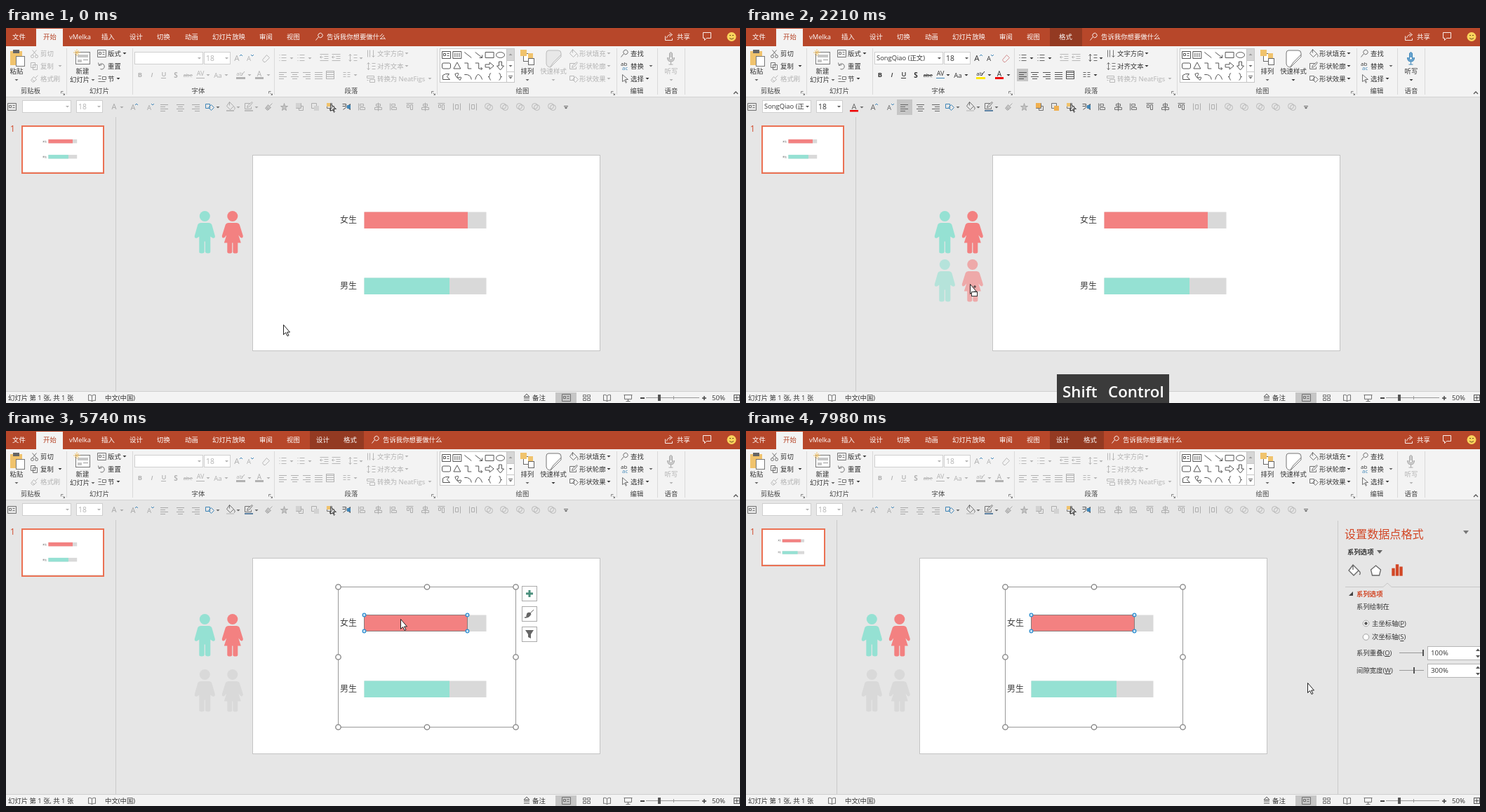
Recreate the animation shown at these times as an HTML page with a canvas. Size 1046 px wide and 535 px high, loop 8 s.

```html
<!DOCTYPE html>
<html lang="zh-CN">
<head>
<meta charset="utf-8">
<style>
html, body { margin: 0; width: 100%; height: 100%; overflow: hidden; background: #e6e6e6 }
canvas { display: block }
</style>
</head>
<body>
<canvas id="stage" width="1046" height="535"></canvas>
<script>
const c = document.getElementById('stage').getContext('2d', { alpha: false });
const FONT = "'Open Sans','Noto Sans CJK SC','Noto Sans CJK',sans-serif";
const INK = '#333', DIM = '#b2b2b2', RED = '#b7472a', ORANGE = '#d24726', GOLD = '#f0c36d', BLUE = '#3f86b8';
const PINK = '#f38181', TEAL = '#95e1d3', GRAY = '#d9d9d9', LINE = '#c6c6c6', PANEL = '#f3f3f3';

const MAN = 'M-6 9.5H6Q9 9.5 10 12L14.5 28Q15 32 11 31L8 29V50.5Q8 53 4.5 53T.6 50.5V36H-.6V50.5Q-.6 53-4.5 53T-8 50.5V29L-11 31Q-15 32-14.5 28L-10 12Q-9 9.5-6 9.5Z';
const WOMAN = 'M-6 9.5H6Q9 9.5 10 12L15 28Q15 32 11.5 30.5L8.5 27L12 38H7.5V51Q7.5 53 4 53T.6 51V38H-.6V51Q-.6 53-4 53T-7.5 51V38H-12L-8.5 27L-11.5 30.5Q-15 32-15 28L-10 12Q-9 9.5-6 9.5Z';
const ICON = {
  cut: 'M-3-5L3 2M3-5L-3 2M-5 4a2 2 0 1 0 4 0a2 2 0 1 0-4 0M1 4a2 2 0 1 0 4 0a2 2 0 1 0-4 0',
  copy: 'M-5-5H1V2H-5ZM-2-2H4V5H-2Z',
  brush: 'M5-5L1-1M-1-3L3 1L-2 5L-5 2ZM-3 1L0 4',
  bucket: 'M-1-6L5 0L0 5L-5 0ZM-1-6V-1M5 0Q8 3 6 5',
  pen: 'M2-4H-5V4H4V1M-2 2L-1-1L5-6L6-5L1 1Z',
  layout: 'M-6-5H6V5H-6ZM-4-2H-1V1H-4ZM1-2H4M1 1H4',
  undo: 'M-4-1A4 4 0 1 1-2 4M-5-5L-4-1L0-2',
  section: 'M-5-4H-1M1-3H6V1H1ZM-5 0H-1M-5 4H5',
  eraser: 'M-5 2L1-5L5-1L-1 5H-3Z',
  search: 'M-1 0a3 3 0 1 0 5-4a3 3 0 1 0-5 4L-5 5',
  pointer: 'M-3-6V4L0 2L2 6L3 5L1 1H5Z',
  star: 'M0-5L1-1H5L2 1L3 5L0 3L-3 5L-2 1L-5-1H-1Z',
  stack: 'M-5-5H2V2H-5ZM2-1H5V5H-1V2',
  shapes: 'M-5-4H1V2H-5ZM-1 1L3-3L7 1L3 5Z',
  list: 'M-5-4H-4M-5 0H-4M-5 4H-4M-2-4H5M-2 0H5M-2 4H5',
  indent: 'M-6-5H6M0-2H6M0 1H6M-6 4H6M-2-1H-6L-4-3M-6-1L-4 1',
  spacing: 'M-4-5V5M-6-3L-4-5L-2-3M-6 3L-4 5L-2 3M1-4H6M1 0H6M1 4H6',
  columns: 'M-5-4H-1M-5-1H-1M-5 2H-1M1-4H5M1-1H5M1 2H5',
  textDir: 'M-5-5V5M-2-5V5M3-5V5M1 3L3 5L5 3',
  convert: 'M-6-4H4V-1H-6ZM-2 1H5V5H-2ZM-6 2H-4',
  launcher: 'M-2 1V-2H1M0 0L3 3M3 1V3H1',
  comment: 'M-5-5H6V3H0L-3 6V3H-5Z',
  share: 'M-5-1V5H5V2M-3 2Q-2-3 3-3M1-6L5-3L1 0',
  mic: 'M-2-7Q0-10 2-7V1Q0 4-2 1ZM-5-1Q-5 5 0 5T5-1M0 5V9M-3 9H3',
  book: 'M0-3Q-3-5-5-4V4Q-3 3 0 5Q3 3 5 4V-4Q3-5 0-3V5',
  grid: 'M-5-4H-1V-1H-5ZM1-4H5V-1H1ZM-5 1H-1V4H-5ZM1 1H5V4H1Z',
  show: 'M-6-4H6M-5-4V2H5V-4M0 2V5M-3 5H3',
  funnel: 'M-6-6H6L2 0V6L-2 4V0Z',
  pentagon: 'M0-7L7-1L5 7H-5L-7-1Z',
  circles: 'M-5-1a4 4 0 1 0 8 0a4 4 0 1 0-8 0M-2 1a4 4 0 1 0 8 0a4 4 0 1 0-8 0',
  alignL: 'M-5-5V5M-3-4H2V-1H-3ZM-3 1H4V4H-3Z',
  alignC: 'M0-6V6M-3-4H3V-1H-3ZM-5 1H5V4H-5Z',
  alignT: 'M-5-5H5M-4-3V1H-1V-3ZM1-3V4H4V-3Z',
  spread: 'M-5-5V5M5-5V5M-2-3H2V3H-2Z'
};
const GALLERY = [
  ICON.layout, 'M-6-5H6V5H-6ZM-3-3V3M0-3V3M3-3V3', 'M-5-4L5 4', 'M-5-4L5 4M5 0V4H1', 'M-6-4H6V4H-6Z', 'M-6 0A6 4 0 1 1 6 0A6 4 0 1 1-6 0',
  'M-4-4H4Q6-4 6-2V2Q6 4 4 4H-4Q-6 4-6 2V-2Q-6-4-4-4', 'M0-5L5 4H-5Z', 'M-5-4H0V4H5', 'M-5-4H0V4H5M3 2L5 4L3 6', 'M-6-2H0V-5L6 0L0 5V2H-6Z', 'M-2-6H2V0H5L0 6L-5 0H-2Z',
  'M-5 4V-2L-1-4H4L1 0L5 4Z', 'M-3-4Q4-7 1-2T3 1T4 5L-2-1Z', 'M-5-3Q4-4 5 4', 'M-5 4Q-3-4 0-3T5 4', 'M2-5Q0-5 0-2T-2 0Q0 0 0 2T2 5', 'M-2-5Q0-5 0-2T2 0Q0 0 0 2T-2 5'];

// time, x, y of the pointer tip
const PATH = [[0, 395, 423], [410, 395, 423], [680, 242, 370], [1110, 384, 231], [1190, 389, 221], [1270, 389, 221],
  [1650, 319, 296], [1900, 319, 296], [2210, 319, 365], [2500, 319, 375], [3010, 319, 375], [3290, 354, 134],
  [3760, 322, 109], [3920, 322, 109], [4640, 530, 256], [4940, 562, 268], [6280, 562, 268], [6510, 603, 403],
  [6730, 608, 413], [7510, 608, 413], [7960, 800, 359], [8000, 800, 359]];

const MENU = [[279, '删除系列(T)'], [298, '重设以匹配样式(A)', 'undo'], [319, '更改系列图表类型(Y)...', 'chart'], [338, '编辑数据(E)', 'layout'],
  [357, '三维旋转(R)...', 'copy'], [378, '添加数据标签(B)'], [398, '添加趋势线(R)...'], [417, '设置数据点格式(F)...', 'chart'], [437, '新建批注(M)', 'comment']];

function pointerAt(t) {
  const i = PATH.findIndex(k => k[0] > t), [t0, x0, y0] = PATH[i - 1], [t1, x1, y1] = PATH[i];
  const p = (t - t0) / (t1 - t0);
  return [x0 + (x1 - x0) * p, y0 + (y1 - y0) * p];
}
function text(s, x, y, color = INK, size = 9.4, align = 'left', weight = 400) {
  c.font = `${weight} ${size}px ${FONT}`;
  c.textAlign = align;
  c.fillStyle = color;
  c.fillText(s, x, y + size * .37);
}
function box(x, y, w, h, fill, stroke) {
  if (fill) { c.fillStyle = fill; c.fillRect(x, y, w, h); }
  if (stroke) { c.strokeStyle = stroke; c.lineWidth = 1; c.strokeRect(x + .5, y + .5, w - 1, h - 1); }
}
function shape(d, x, y, fill, stroke, width = 1) {
  const path = new Path2D(d);
  c.save();
  c.translate(x, y);
  if (fill) { c.fillStyle = fill; c.fill(path); }
  if (stroke) { c.strokeStyle = stroke; c.lineWidth = width; c.stroke(path); }
  c.restore();
}
const icon = (name, x, y, color = '#666') => shape(ICON[name], x + .5, y + .5, null, color, .9);
const arrow = (x, y, color = '#666') => shape('M-2.5-1H2.5L0 1.5Z', x, y, color);
function dot(x, y, r, fill, stroke, width = 1) {
  c.beginPath();
  c.arc(x, y, r, 0, 7);
  if (fill) { c.fillStyle = fill; c.fill(); }
  if (stroke) { c.strokeStyle = stroke; c.lineWidth = width; c.stroke(); }
}
function lines(x, y, color, side) {
  [11, 7, 11, 7].forEach((w, i) => box(x - 5 + (11 - w) / 2 * side, y - 4 + i * 3, w, 1, color));
}
function combo(x, y, w, s, on, size) {
  box(x, y, w, 18, '#fff', '#cfcfcf');
  text(s, x + 3, y + 9, on ? INK : DIM, size);
  arrow(x + w - 5.5, y + 9, on ? '#555' : DIM);
}
function chartIcon(x, y, s, colors) {
  colors.forEach((col, i) => box(x + (i * 5 - 7) * s, y + [-3, -8, -5][i] * s, 4 * s, [10, 15, 12][i] * s, col));
}
function accelText(s, x, y, color = INK) {
  text(s, x, y, color);
  const i = s.indexOf('(') + 1, w = n => c.measureText(s.slice(0, n)).width;
  c.fillRect(x + w(i), Math.round(y + 4.6), w(i + 1) - w(i), 1);
}

function tabs(mode) {
  box(0, 0, 1046, 26, RED);
  if (mode) box(433, 0, mode > 1 ? 77 : 46, 26, '#933a22');
  box(43, 1, 38, 25, PANEL);
  [['文件', 9], ['开始', 53], ['vMelka', 90], ['插入', 136], ['设计', 176], ['切换', 215], ['动画', 255], ['幻灯片放映', 294], ['审阅', 361], ['视图', 400]]
    .forEach(([s, x], i) => text(s, x, 12.5, i == 1 ? RED : '#fff'));
  if (mode == 1) text('格式', 446, 12.5, '#fff');
  if (mode == 2) { text('设计', 442, 12.5, '#fff'); text('格式', 481, 12.5, '#fff'); }
  const tellX = [446, 495, 526][mode];
  icon('search', tellX, 12, '#fff');
  text('告诉我你想要做什么', tellX + 11, 12.5, '#fff');
  icon('share', 944, 12, '#fff');
  text('共享', 956, 12.5, '#fff');
  icon('comment', 998, 11, '#fff');
  dot(1034, 12.5, 6.5, '#fbd45c');
  shape('M-3-2H-1M1-2H3M-3 2Q0 5 3 2', 1034, 12.5, null, '#6b4a20');
}

function ribbon(mode) {
  const shaped = mode == 1, any = mode > 0;
  const ink = on => on ? INK : DIM;
  const row = (name, s, ix, y, on, arrowX) => {
    icon(name, ix, y, on ? '#666' : DIM);
    text(s, ix + 9, y + .5, ink(on));
    if (arrowX) arrow(arrowX, y, ink(on));
  };
  const f = ink(shaped);
  box(0, 26, 1046, 72, PANEL);
  box(0, 98, 1046, 1, '#d2d2d2');
  [86, 180, 382, 614, 870, 928, 967].forEach(x => box(x, 29, 1, 66, '#dadada'));
  [['剪贴板', 35], ['幻灯片', 133], ['字体', 274], ['段落', 492], ['绘图', 736], ['编辑', 899], ['语音', 948]].forEach(([s, x]) => text(s, x, 90, '#444', 9.4, 'center'));
  [80, 376, 608, 864].forEach(x => icon('launcher', x, 92, '#777'));
  shape('M-3 2L0-1L3 2', 1040, 92, null, '#555', 1.3);

  box(6, 33, 17, 20, GOLD); box(10, 31, 9, 5, '#666'); box(14, 40, 13, 15, '#fff', '#777');
  text('粘贴', 15, 62, INK, 9.4, 'center'); arrow(15, 74);
  row('cut', '剪切', 40, 36, any); row('copy', '复制', 40, 54, any, 77); row('brush', '格式刷', 40, 72, false);

  box(99, 34, 21, 18, '#fff', '#777'); box(102, 38, 15, 4, LINE); box(102, 45, 6, 4, LINE); box(110, 45, 7, 1, '#999');
  shape('M0-5V5M-5 0H5M-3-3L3 3M3-3L-3 3', 101, 35, null, GOLD);
  text('新建', 109, 62, INK, 9.4, 'center'); text('幻灯片', 91, 74); arrow(124, 74);
  row('layout', '版式', 136, 36, true, 169); row('undo', '重置', 136, 54, true); row('section', '节', 136, 72, true, 160);

  combo(183, 34, 98, shaped ? 'SongQiao (正文)' : '', shaped);
  combo(282, 34, 38, '18', shaped, 10.3);
  const grow = (x, y, col) => {
    text('A', x, y, col, 11.5, 'center'); shape('M-2 1L0-1L2 1', x + 6, y - 4, null, BLUE);
    text('A', x + 17, y + .5, col, 9.5, 'center'); shape('M-2-1L0 1L2-1', x + 22, y - 4, null, BLUE);
  };
  grow(329, 43, f);
  icon('eraser', 370, 43, shaped ? '#d08080' : DIM);
  text('B', 191, 67, f, 9.4, 'center', 700); text('I', 208, 67, f, 9.4, 'center', 'italic 600');
  text('U', 225, 66, f, 9.4, 'center', 600); box(221, 71, 7, 1, f);
  text('S', 242, 67, f, 10, 'center', 700);
  text('abc', 259, 67, f, 8, 'center'); box(253, 67, 13, 1, f);
  text('AV', 277, 65, f, 9, 'center'); box(271, 71, 12, 1, shaped ? BLUE : DIM);
  text('Aa', 302, 67, f, 9.6, 'center');
  text('ab', 333, 65, f, 8, 'center'); shape('M0 0L5-6', 335, 68, null, f); box(328, 70, 13, 3, shaped ? '#ffe800' : DIM);
  text('A', 361, 65, f, 10, 'center'); box(355, 70, 12, 3, shaped ? '#e00' : DIM);
  [288, 314, 347, 374].forEach(x => arrow(x, 67, f));

  const mark = shaped ? '#555' : DIM;
  if (shaped) box(386, 58, 16, 18, '#c6c6c6');
  icon('list', 394, 42, mark); icon('list', 420, 42, mark);
  icon('indent', 453, 42, DIM); icon('indent', 470, 42, DIM); icon('spacing', 494, 42, mark);
  [407, 433, 506].forEach(x => arrow(x, 43, f));
  [0, 1, 2, 0, 0].forEach((side, i) => {
    lines(394 + i * 17, 67, mark, side);
    if (i > 2) { box(389 + i * 17, 66, 11, 1, mark); box(389 + i * 17, 72, 11, 1, mark); }
  });
  box(456, 61, 12, 12, null, mark);
  icon('columns', 485, 67, mark); arrow(498, 67, f);
  row('textDir', '文字方向', 520, 36, shaped, 571); row('spacing', '对齐文本', 520, 54, shaped, 571);
  row('convert', '转换为 NeatFigs', 520, 72, false, 604);

  box(618, 29, 107, 49, '#fff', LINE); box(713, 30, 1, 47, LINE);
  box(714, 30, 10, 16, '#d6d6d6'); box(714, 46, 10, 1, LINE); box(714, 62, 10, 1, LINE);
  shape('M-2.5 1H2.5L0-1.5Z', 719, 38, '#999'); arrow(719, 54); arrow(719, 71); box(716, 68, 6, 1, '#666');
  GALLERY.forEach((d, i) => shape(d, 627.5 + i % 6 * 15.4, 38.5 + Math.floor(i / 6) * 15.5, null, '#555'));
  box(737, 36, 12, 12, '#fff', '#666'); box(733, 31, 9, 9, GOLD); box(744, 43, 9, 10, '#fff', '#666'); box(744, 36, 7, 7, GOLD);
  text('排列', 743, 62, INK, 9.4, 'center'); arrow(743, 74);
  shape('M-7-12H7Q11-12 11-8V-3L0 8L-4 12Q-9 12-10 7V-8Q-10-12-7-12ZM11-6L0 5L-4 11', 780, 44, any ? '#fff' : '#e8e8e8', any ? '#777' : '#bbb');
  text('快速样式', 780, 62, ink(any), 9.4, 'center'); arrow(780, 74, ink(any));
  row('bucket', '形状填充', 808, 36, any, 859); row('pen', '形状轮廓', 808, 54, any, 859); row('shapes', '形状效果', 808, 72, any, 859);

  row('search', '查找', 881, 36, true); row('pointer', '选择', 881, 72, true, 914);
  text('ab', 876, 51, INK, 8); text('ac', 878, 57, BLUE, 8); text('替换', 890, 54.5); arrow(919, 54);
  shape(ICON.mic, 947.5, 43, shaped ? '#6aa5d0' : '#ccc', shaped ? BLUE : '#aaa');
  text('听写', 948, 62, ink(shaped), 9.4, 'center'); arrow(948, 74, ink(shaped));

  // quick toolbar
  icon('layout', 8, 112);
  combo(23, 103, 70, shaped ? 'SongQiao (正' : '', shaped);
  combo(100, 103, 38, '18', shaped, 10.3);
  const q = shaped ? '#666' : '#a8a8a8', p = any ? '#666' : '#a8a8a8';
  text('A', 154, 111.5, q, 11, 'center'); if (shaped) box(148, 117, 12, 2.5, '#e00'); arrow(165, 113, q);
  text('A', 181, 113, q, 11, 'center'); shape('M-2 1L0-1L2 1', 186, 109, null, BLUE);
  text('A', 204, 113, q, 9.5, 'center'); shape('M-2-1L0 1L2-1', 209, 109, null, BLUE);
  if (shaped) box(215, 102, 22, 22, '#c6c6c6');
  [225, 248, 270].forEach((x, i) => lines(x, 113, q, i));
  shape(ICON.shapes, 289.5, 112.5, null, BLUE); arrow(302, 113);
  icon('bucket', 319, 111, p); box(314, 117, 11, 2, any ? '#ccc' : '#bbb'); arrow(331, 113, p);
  icon('pen', 345, 111, p); box(340, 117, 12, 2, any ? '#5a7fa0' : '#bbb'); arrow(357, 113, p);
  ['brush', 'star'].forEach((n, i) => shape(ICON[n], 374.5 + i * 22, 112.5, '#c4c4c4', '#a8a8a8'));
  [418, 440].forEach((x, i) => { icon('stack', x, 112, q); box(x - 5 + i * 4, 107 + i * 4, 7, 7, shaped ? '#f0b050' : '#d2d2d2'); });
  icon('stack', 462, 112); box(457, 107, 5, 5, GOLD); icon('pointer', 465, 114, '#333');
  shape('M-6-4H-1V-1H-6M-5 4L0 0L5-4V4L0 0', 485.5, 112.5, null, '#555'); box(486, 110, 5, 5, BLUE);
  ['alignL', 'alignC', 'alignL', 'alignT', 'alignC', 'alignT', 'spread', 'spread'].forEach((n, i) => icon(n, Math.round(507 + i * 22.5), 112, i < 6 ? q : '#a8a8a8'));
  [687, 709, 732, 754, 777].forEach(x => icon('circles', x, 112, '#b4b4b4'));
  box(795, 111, 6, 1, '#666'); arrow(798, 114);
}

function slide() {
  box(351, 182, 495, 278, '#fff');
  [['女生', 262.5, 147.5, PINK], ['男生', 356.5, 121.5, TEAL]].forEach(([s, y, w, col]) => {
    text(s, 476, y + 11.5, '#404040', 12);
    box(510.5, y, 174, 23.5, GRAY);
    box(510.5, y, w, 23.5, col);
  });
}
function people(dy, man, woman, alpha = 1) {
  c.globalAlpha = alpha;
  [[283.3, MAN, man], [322.8, WOMAN, woman]].forEach(([x, d, col]) => { dot(x, 268.5 + dy, 7.5, col); shape(d, x, 268.5 + dy, col); });
  c.globalAlpha = 1;
}
function frame(x0, y0, x1, y1) {
  box(x0, y0, x1 - x0 + 1, y1 - y0 + 1, null, '#999');
  const xs = [x0, (x0 + x1) / 2, x1], ys = [y0, (y0 + y1) / 2, y1];
  xs.forEach((x, i) => ys.forEach((y, j) => (i != 1 || j != 1) && dot(x + .5, y + .5, 3.7, '#fff', '#808080', 1.3)));
}
function personFrames(dy) {
  [[262, 301], [304, 344]].forEach(([a, b]) => {
    const m = Math.floor((a + b) / 2) + 1;
    box(m, 235 + dy, 1, 19, '#999');
    frame(a, 254 + dy, b, 327 + dy);
    dot(m, 228 + dy, 6, null, '#8a8a8a', 5);
    dot(m, 228 + dy, 6, null, '#fff', 2.6);
    shape('M3-2H11L7 3Z', m, 228 + dy, '#fff', '#8a8a8a');
  });
}
function chartSelection(t) {
  frame(473, 222, 726, 422);
  const bars = [[263, 147]];
  if (t < 5740) bars.push([357, 121]);
  bars.forEach(([y, w]) => {
    box(510, y - 1, w + 1, 24, null, '#8c7a7a');
    [0, w].forEach(dx => [0, 23].forEach(dy => dot(510.5 + dx, y - .5 + dy, 2.3, '#cfe6f7', '#2f8fd0', 1.3)));
  });
  if (t > 5430 && t < 7360) {
    [221, 250, 279].forEach(y => box(735, y, 22, 22, '#fff', '#ababab'));
    shape('M-5 0H5M0-5V5', 746, 232, null, '#4a8f7c', 3);
    shape('M6-6L0 0M0-2Q-4-2-4 2T-7 5Q0 6 2 0Z', 746, 261, '#666', '#666');
    shape(ICON.funnel, 746, 290, '#666');
  }
}
function popups(t, y) {
  if (t >= 6000 && t < 7110) {
    box(563, 202, 146, 55, '#fff', LINE);
    icon('bucket', 580, 214); box(572, 222, 18, 3, LINE); arrow(593, 215);
    icon('pen', 610, 214, BLUE); box(602, 222, 18, 3, '#5a7fa0'); arrow(623, 215);
    text('填充', 581, 238, INK, 9.4, 'center'); text('边框', 611, 238, INK, 9.4, 'center');
    box(626, 219, 80, 19, '#fff', '#ababab');
    text('系列 "系列 1" 点', 629, 228.5); arrow(700, 228);
  }
  if (t >= 6070 && t < 6960) {
    box(563, 268, 138, 181, '#fff', LINE);
    MENU.forEach(([my, s, ic], i) => {
      if (i != 4 && t > 6280 && Math.abs(y - my) < 9.8) box(565, my - 10, 135, 20, '#c5c5c5');
      if (ic == 'chart') chartIcon(575, my, .7, ['#e0a050', BLUE, '#666']);
      else if (ic) icon(ic, 574, my - 1, i == 4 ? DIM : '#4a7a90');
      accelText(s, 589, my, i == 4 ? DIM : INK);
    });
    [308, 368, 427].forEach(ly => box(588, ly, 112, 1, '#dcdcdc'));
    [338, 378].forEach(ly => { box(683, ly - 6, 1, 12, '#d0d0d0'); shape('M-1.5-3L2 0L-1.5 3Z', 691, ly, '#444'); });
  }
}
function formatPane() {
  box(843, 128, 203, 390, '#e6e6e6');
  box(843, 128, 1, 390, '#cacaca');
  text('设置数据点格式', 853, 147, ORANGE, 16.1);
  shape('M-4-2H4L0 3Z', 1026, 144, '#777');
  text('系列选项', 857, 172.5, INK, 9.4, 'left', 600);
  shape('M-4-2H4L0 3Z', 903, 172, '#666');
  shape('M-1-8L7 0L0 7L-7 0ZM-1-8V-1M7 0Q11 4 8 6', 866, 199, '#fff', '#666', 1.3);
  shape(ICON.pentagon, 897.5, 199, '#fff', '#666', 1.3);
  chartIcon(928, 199, 1.1, [ORANGE, ORANGE, ORANGE]);
  shape('M854 222.5H908L914 217L920 222.5H1046', 0, 0, null, '#c8c8c8');
  shape('M2-3V3H-4Z', 863, 232, '#444');
  text('系列选项', 870, 233, ORANGE, 9.4, 'left', 600);
  text('系列绘制在', 870, 251);
  [['主坐标轴(P)', 274.5], ['次坐标轴(S)', 294]].forEach(([s, y], i) => {
    dot(883.5, y, 4.3, '#fff', '#a0a0a0');
    if (!i) dot(883.5, y, 2.2, '#555');
    accelText(s, 892, y);
  });
  [['系列重叠(O)', 316.5, '100%', 964], ['间隙宽度(W)', 341.5, '300%', 951]].forEach(([s, y, v, x]) => {
    accelText(s, 870, y);
    box(931, y - .5, 35, 1, '#999'); box(x, y - 4.5, 2, 9, '#555');
    box(971, y - 9.5, 80, 20, '#fff', '#b5b5b5');
    text(v, 976, y, INK, 9.8);
    shape('M-3 1.5H3L0-2Z', 1043, y - 4, '#555'); shape('M-3-1.5H3L0 2Z', 1043, y + 5, '#555');
  });
}
function statusBar() {
  box(0, 518, 1046, 17, PANEL);
  box(0, 518, 1046, 1, '#cfcfcf');
  text('幻灯片 第 1 张, 共 1 张', 3, 527.5);
  icon('book', 122, 527); text('中文(中国)', 141, 527.5);
  shape('M-4-1H4L0-5ZM-4 1H4M-4 4H4', 742, 527, null, '#555'); text('备注', 750, 527.5);
  box(783, 520, 30, 15, '#c6c6c6');
  icon('layout', 798, 527); icon('grid', 827, 527); icon('book', 856, 527); icon('show', 886, 527);
  box(904, 527, 6, 2, '#444'); box(912, 527, 76, 1, '#999'); box(951, 525, 1, 5, '#999'); box(929, 523, 4, 9, '#555');
  shape('M-3 0H3M0-3V3', 995, 528, null, '#444', 1.5);
  text('50%', 1006, 527.5, INK, 9.6);
  box(1037, 523, 9, 9, null, '#555'); shape('M-3 0H3M0-3V3', 1041.5, 527.5, null, '#555');
}
function caption(x, w, words) {
  box(x, 494, w, 41, '#3b3b3b');
  words.forEach(([s, wx]) => text(s, wx, 519, '#fff', 22.3, 'left', 600));
}

function render(t) {
  const [x, y] = pointerAt(t), mode = t < 1270 ? 0 : t < 5350 ? 1 : 2;
  const paneOpen = t >= 7510, dragging = t >= 1900 && t < 2760;
  box(0, 0, 1046, 535, '#e6e6e6');
  ribbon(mode);
  tabs(mode);

  const thumb = paneOpen ? .18 : .2345;
  box(paneOpen ? 129 : 156, 127, 1, 391, '#cacaca');
  text('1', 6, 144, ORANGE, 12);
  c.save();
  c.translate(23, 140); c.scale(thumb, thumb); c.translate(-351, -182);
  slide();
  c.restore();
  c.strokeStyle = '#eb7153'; c.lineWidth = 2;
  c.strokeRect(23, 140, Math.round(495 * thumb), paneOpen ? 52 : 67);

  c.save();
  if (paneOpen) c.translate(-104, 0);
  slide();
  box(351, 181, 496, 280, null, '#c4c4c4');
  people(0, TEAL, PINK);
  if (dragging) people(y - 296, TEAL, PINK, .6);
  if (t >= 2760) t < 3920 ? people(79, TEAL, PINK) : people(79, GRAY, GRAY);
  if (mode == 1 && !dragging) personFrames(t < 1900 ? 0 : 79);
  if (mode == 2) chartSelection(t);
  c.restore();

  if (t > 680 && t < 1270) box(242, y, x - 242, 370 - y, 'rgba(96,96,96,.44)', '#707070');
  popups(t, y);
  if (paneOpen) formatPane();
  statusBar();
  if (t >= 1800 && t < 2610) caption(443, 160, [['Shift', 451], ['Control', 516]]);
  else if (t >= 2610 && t < 3700) caption(475, 96, [['Control', 483]]);

  shape('M0 0V14L3 11L5.5 16L7.5 15L5 10.5H9Z', x + .5, y + .5, '#fff', '#222');
  if (dragging) { box(x + 2, y + 11, 9, 7, '#fff', '#333'); shape('M-2 0H2M0-2V2', x + 7, y + 4, null, '#333'); }
}
function tick(now) {
  render(now % 8000);
  requestAnimationFrame(tick);
}
requestAnimationFrame(tick);
</script>
</body>
</html>
```
